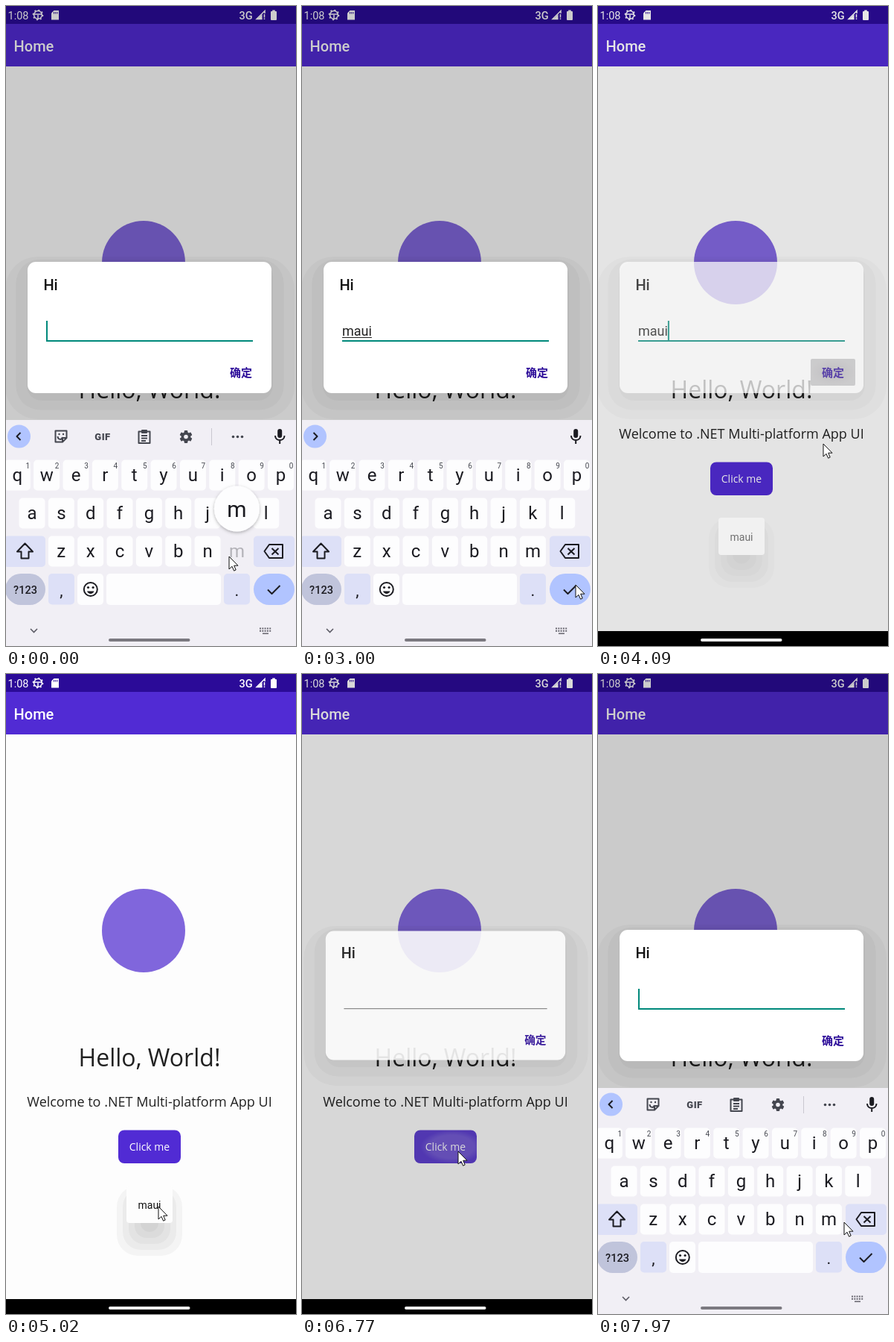
Recreate the animation shown at these times as an HTML page. Size 390 by 858 pixels, loop 8000 ms.

```html
<!DOCTYPE html>
<html lang="en">
<head>
<meta charset="utf-8">
<title>Prompt dialog</title>
<style>
html, body { margin: 0; width: 100%; height: 100%; overflow: hidden; background: #fdfdfd; }
svg { display: block; font-family: Roboto, sans-serif; }
.open { font-family: "Open Sans", sans-serif; }
.cjk { font-family: "Noto Sans CJK SC", "Noto Sans CJK", sans-serif; }
.line { fill: none; stroke: #1b1b21; stroke-width: 2; stroke-linejoin: round; }
.tool { fill: none; stroke: #44464f; stroke-width: 2; stroke-linejoin: round; }
.status { fill: none; stroke: #fff; stroke-width: 1.5; }
</style>
</head>
<body>
<svg id="stage" width="390" height="858" viewBox="0 0 390 858"></svg>
<script>
const LOOP = 8000;
const INK = "#1b1b21";

// Letter keys: every row is shifted by a fraction of the same pitch.
const PITCH = 39.35;
const KEYS = ["qwertyuiop", "asdfghjkl", "zxcvbnm"].flatMap((letters, row) =>
  [...letters].map((letter, i) => ({
    letter, x: 15.3 + (i + [0, .5, 1.5][row]) * PITCH, y: 629 + 51 * row,
    digit: row === 0 ? (i + 1) % 10 : ""
  })));
const key = letter => KEYS.find(k => k.letter === letter);

const PRESSES = [
  { letter: "m", down: 0, up: 120 },
  { letter: "a", down: 510, up: 640 },
  { letter: "u", down: 1310, up: 1460 },
  { letter: "i", down: 2130, up: 2420 }
];
const onKey = (start, end, letter) => ({ start, end, x: key(letter).x + 5, y: key(letter).y + 7 });
const MOVES = [
  onKey(120, 510, "a"), onKey(640, 1040, "u"), onKey(1460, 1730, "i"),
  { start: 2420, end: 2900, x: 368, y: 776 },
  { start: 3250, end: 3700, x: 313, y: 493 },
  { start: 3900, end: 4090, x: 303, y: 587 },
  { start: 4090, end: 4510, x: 205, y: 714 },
  { start: 5020, end: 5560, x: 210, y: 640 },
  { start: 6890, end: 7200, x: 200, y: 437 },
  { start: 7500, end: 7970, x: 331, y: 735 }
];

const ramp = (t, start, end) => Math.min(1, Math.max(0, (t - start) / (end - start)));
const smooth = p => p * p * (3 - 2 * p);
const easeOut = p => 1 - (1 - p) ** 2;

const keyboardShown = t => t < 5000 ? 1 - smooth(ramp(t, 3020, 3400)) : smooth(ramp(t, 7300, 7700));
const dialogShown = t => t < 5000 ? 1 - ramp(t, 3960, 4220) : easeOut(ramp(t, 6650, 6890));
const toastShown = t => ramp(t, 3960, 4200) * (1 - ramp(t, 5900, 6090));

const typed = t => t > 4220 ? "" : PRESSES.filter(p => p.up <= t).map(p => p.letter).join("");
const ruler = document.createElement("canvas").getContext("2d");
function textWidth(s) {
  ruler.font = "18px Roboto, sans-serif";
  return ruler.measureText(s).width;
}

const rect = (x, y, w, h, r, fill, extra = "") =>
  `<rect x="${x}" y="${y}" width="${w}" height="${h}" rx="${r}" fill="${fill}" ${extra}/>`;
const text = (x, y, s, size, fill = INK, extra = "") =>
  `<text x="${x}" y="${y}" font-size="${size}" fill="${fill}" ${extra}>${s}</text>`;
const centred = (x, y, s, size, fill, extra = "") => text(x, y, s, size, fill, `text-anchor="middle" ${extra}`);
const path = (d, extra = 'class="line"') => `<path d="${d}" ${extra}/>`;
const circle = (x, y, r, fill, extra = "") => `<circle cx="${x}" cy="${y}" r="${r}" fill="${fill}" ${extra}/>`;
const group = (content, extra) => `<g ${extra}>${content}</g>`;
const repeat = (n, draw) => Array.from({ length: n }, (_, i) => draw(i)).join("");
const MEDIUM = 'font-weight="500"';

const DEFS = `<defs>
  <radialGradient id="grey"><stop offset="0" stop-color="#b9b8bb"/><stop offset="1" stop-color="#c9c8ca"/></radialGradient>
  <radialGradient id="violet" cx=".6"><stop offset=".7" stop-color="#755cd4"/><stop offset="1" stop-color="#5f41d0"/></radialGradient>
  <filter id="soft" x="-30%" y="-30%" width="160%" height="160%">
    <feDropShadow dx="0" dy="1.5" stdDeviation="2" flood-opacity=".3"/></filter>
</defs>`;

function statusBar() {
  return rect(0, 0, 390, 24, 0, "#2b0b98") + text(2.5, 18, "1:08", 14.5, "#fff")
    + circle(43, 12, 5.4, "none", 'class="status"')
    + circle(43, 12, 6.6, "none", 'class="status" stroke-dasharray="2 3.2"')
    + path("M38 11H48M43 12V17", 'class="status"')
    + path("M64.5 6H71V18.5H61V9.5Z", 'fill="#fff"')
    + path("M64.5 8V10.5M66.7 8V10.5M68.9 8V10.5", 'stroke="#2b0b98"')
    + text(313.5, 17.5, "3G", 14.5, "#fff", MEDIUM)
    + path("M344.5 17.5H337L348 6.5V10M347.5 11V15.5M347.5 16.5V18", 'class="status"')
    + path("M338 17.5L344.5 11V17.5Z", 'fill="#fff"')
    + rect(356, 7, 8, 12, 1, "#fff") + rect(358.2, 5.5, 3.6, 2, 0, "#fff");
}

function page(t) {
  const pressed = t >= 6630 && t < 7040;
  return rect(0, 0, 390, 858, 0, "#fdfdfd") + statusBar()
    + rect(0, 24, 390, 57, 0, "#512bd4")
    + text(10.6, 61, "Home", 20, "#fff", MEDIUM)
    + circle(185, 344, 56, "#8066dc")
    + group(
      centred(193, 526, "Hello, World!", 32, "#212121")
      + centred(193, 580, "Welcome to .NET Multi-platform App UI", 18, "#212121")
      + rect(151, 611.5, 84, 44.5, 8, pressed ? "url(#violet)" : "#512bd4")
      + centred(193, 639, "Click me", 14, "#fff"), 'class="open"')
    + rect(0, 838, 390, 20, 0, "#000");
}

function toast(t) {
  const shadow = repeat(5, i =>
    rect(149 + 8 * i, 686 + 4 * i, 88 - 16 * i, 94 - 12 * i, 28 - 4 * i, "#000", 'opacity=".037"'));
  return group(shadow + rect(162, 686, 62, 50, 4, "#fdfdfd") + centred(193, 716.5, "maui", 14, "#111"),
    `opacity="${toastShown(t)}"`);
}

function dialog(t) {
  const shown = dialogShown(t), alpha = shown ** .45;
  const focused = t < 5000 || t >= 7300;
  const word = typed(t), end = 54 + textWidth(word);
  const lastKey = PRESSES.filter(p => p.up <= t).pop();
  const caretOn = t >= 3420 || !lastKey || (t - lastKey.up) % 1000 < 500;
  const scale = t < 5000 ? 1 : .93 + .07 * shown;

  const shadow = repeat(3, i =>
    rect(-1 + 14.5 * i, 336 + 3.5 * i, 389 - 29 * i, 218 - 16 * i, 44 - 12 * i, "#000", 'opacity=".032"'));
  let card = rect(29, 343, 328, 176, 11, "#fff")
    + text(50.4, 380.5, "Hi", 20, "#111", MEDIUM)
    + text(54, 442, word, 18, "#212121")
    + (focused ? rect(54, 448, 278, 2, 0, "#00897b") : rect(54, 448.5, 278, 1, 0, "#666"));
  if (word && t < 3150) card += rect(54, 444, end - 54, 1, 0, "#212121");
  if (focused && caretOn) card += rect(end, 422, 2, 26, 0, "#00897b");
  if (t >= 3830 && t < 5000) card += rect(286, 473, 60, 36, 2, "url(#grey)");
  card += centred(316, 497, "确定", 15, "#2b0b98", 'class="cjk" font-weight="700"');
  return group(group(shadow, `opacity="${alpha}"`) + group(card, `opacity="${alpha}"`),
    `transform="translate(193 431) scale(${scale}) translate(-193 -431)"`);
}

function toolIcons() {
  const gear = repeat(6, i => rect(239.7, 569, 4.6, 4, 1, "#44464f", `transform="rotate(${60 * i} 242 577.5)"`));
  return path("M66.5 569.5H81.5V579L76 584.5H66.5ZM76 584.5V579H81.5M69.5 577C70 582 75 582 76 578", 'class="tool"')
    + circle(71.5, 574, 1.2, "#44464f") + circle(77, 574, 1.2, "#44464f")
    + centred(130, 582, "GIF", 13, "#44464f", 'font-weight="900" letter-spacing=".5"')
    + path("M178.5 570.5H193.5V586H178.5ZM182 576H190M182 579.5H190M182 583H188", 'class="tool"')
    + rect(182, 568, 8, 5, 1, "#44464f")
    + gear + circle(242, 577.5, 4.6, "none", 'stroke="#44464f" stroke-width="3.6"')
    + rect(276, 566, 1, 23, 0, "#c9c8d0")
    + repeat(3, i => circle(305.5 + 6 * i, 577.5, 1.8, "#44464f"));
}

function suggestions(word) {
  return [word, "maui".slice(0, word.length + 1), "may"].map((hint, i) =>
    centred(87.5 + 104.5 * i, 585, hint, 18.5, "#303038", i === 1 ? MEDIUM : "")).join("")
    + rect(136, 565, 1, 25, 0, "#c9c8d0") + rect(247, 565, 1, 25, 0, "#c9c8d0");
}

function toolbar(t) {
  const word = typed(t);
  const content = !word ? toolIcons() : t < 2950 ? suggestions(word) : "";
  return circle(17.5, 577, 15.5, "#b1c4ff")
    + path(word ? "M15.5 572L20.5 577L15.5 582" : "M19.5 572L14.5 577L19.5 582")
    + rect(365.2, 567, 6, 12, 3, INK)
    + path("M362 576C362 584 374.5 584 374.5 576M368.2 582V587")
    + content;
}

function letterKeys(held) {
  return KEYS.map(k => {
    const down = k.letter === held;
    return rect(k.x - 17.5, k.y - 20.5, 35, 41, 5, down ? "#f1eff5" : "#fdfdfe")
      + centred(k.x, k.y + 8, k.letter, 24, down ? "#b3b2b8" : INK)
      + centred(k.x + 14, k.y - 9.5, k.digit, 10, "#44464f");
  }).join("");
}

function keyPopup({ letter, x, y }) {
  return circle(x, y - 57, 30.5, "#fdfdfe", 'filter="url(#soft)"') + centred(x, y - 46.5, letter, 30);
}

function specialKeys() {
  const pale = (x, y, w) => rect(x, y, w, 41.5, 5, "#dde0f7");
  return pale(-3, 710.5, 56) + pale(333, 710.5, 55) + pale(57, 761, 35) + pale(293, 761, 35)
    + rect(-1, 761, 54, 42, 21, "#c0c4db") + rect(333, 761, 55, 42, 21, "#b1c4ff")
    + rect(96, 761, 35, 42, 5, "#fdfdfe") + rect(135, 761, 154, 42, 5, "#fdfdfe")
    + centred(26, 788, "?123", 14.5, INK, MEDIUM)
    + centred(74.5, 791, ",", 22) + centred(310.5, 791, ".", 22)
    + path("M25.5 720.5L36 731.5H30.5V740.5H20.5V731.5H15Z")
    + path("M354 722H372V740H354L347.5 731ZM357.5 727L366.5 735.5M366.5 727L357.5 735.5")
    + path("M352 782.5L357.5 788L368.5 777")
    + circle(113.8, 782, 9, "none", 'class="line"')
    + circle(110.5, 779.5, 1.6, INK) + circle(117.1, 779.5, 1.6, INK)
    + path("M109 784.5C110.5 789 117 789 118.5 784.5Z", `fill="${INK}"`)
    + path("M33 835L37.5 839.5L42 835", 'fill="none" stroke="#5d5c66" stroke-width="1.6"')
    + repeat(10, i => rect(341 + (i % 5) * 3.3, 833.5 + (i > 4 ? 3.3 : 0), 2, 2, 0, "#6a6972"))
    + rect(345, 840.5, 8, 1.6, 0, "#6a6972");
}

function keyboard(t) {
  const held = PRESSES.find(p => p.down <= t && t < p.up);
  const content = rect(0, 555, 390, 303, 0, "#f1eff5") + toolbar(t)
    + letterKeys(held?.letter) + specialKeys() + (held ? keyPopup(key(held.letter)) : "");
  return group(content, `transform="translate(0 ${303 * (1 - keyboardShown(t))})"`);
}

function pointer(t) {
  let x = 300, y = 738;
  for (const move of MOVES) {
    const p = smooth(ramp(t, move.start, move.end));
    x += (move.x - x) * p;
    y += (move.y - y) * p;
  }
  return path("M0 0V17L4 13.3L6.6 19.2L9.2 18L6.7 12.2H12Z",
    `transform="translate(${x} ${y})" fill="#fff" stroke="#111"`);
}

function draw(t) {
  const handle = keyboardShown(t) > .5 ? "#7b7980" : "#f2f2f2";
  return DEFS + page(t) + rect(0, 0, 390, 858, 0, "#000", `opacity="${.2 * dialogShown(t)}"`)
    + dialog(t) + toast(t) + keyboard(t)
    + rect(138, 848, 109.5, 4, 2, handle) + pointer(t);
}

const stage = document.getElementById("stage");
function play() {
  stage.innerHTML = draw(performance.now() % LOOP);
  requestAnimationFrame(play);
}
play();
</script>
</body>
</html>
```
